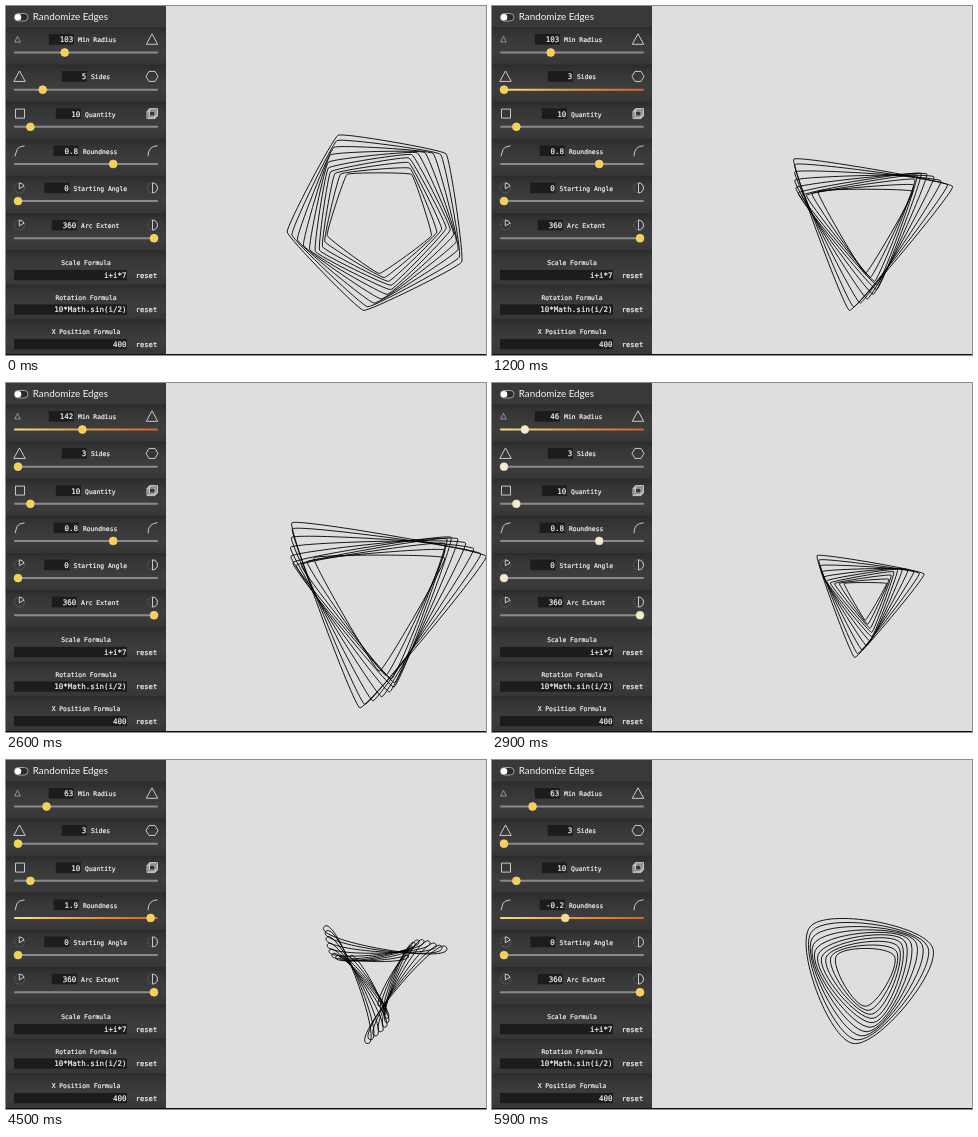
These frames come from a looping animation (480 by 349 pixels, 6000 ms). An HTML page:

```html
<!DOCTYPE html>
<html lang="en">
<head>
<meta charset="utf-8">
<title>Polygon generator</title>
<style>
  html, body { margin: 0; width: 100%; height: 100%; overflow: hidden; background: #dedede; }
  svg { display: block; }
  text { fill: #f4f4f4; stroke: #f4f4f4; stroke-width: .2; font-family: "DejaVu Sans Mono", monospace; }
  .title { font: 9.8px Lato, sans-serif; stroke: none; }
  .label { font-size: 6.35px; }
  .value { font-size: 7.5px; text-anchor: end; }
  .reset { font-size: 7.1px; }
  .mid { text-anchor: middle; }
  .icon { fill: none; stroke: #d8d8d8; stroke-width: .9; }
  .box { fill: #1c1c1c; }
  .thumb { stroke: #e9dcae; stroke-width: .7; }
  .lines { fill: none; stroke: #000; stroke-width: .9; }
</style>
</head>
<body>
<svg id="stage" width="480" height="349" viewBox="0 0 480 349">
  <defs>
    <linearGradient id="row" x2="0" y2="1">
      <stop offset="0" stop-color="#2b2b2b"/>
      <stop offset=".22" stop-color="#363636"/>
      <stop offset=".65" stop-color="#3d3d3d"/>
      <stop offset="1" stop-color="#363636"/>
    </linearGradient>
    <linearGradient id="hot">
      <stop offset="0" stop-color="#f8e07a"/>
      <stop offset=".45" stop-color="#e6a04a"/>
      <stop offset="1" stop-color="#da5f2c"/>
    </linearGradient>
  </defs>
  <rect width="160" height="349" fill="#393939"/>
  <rect x="8.5" y="7.5" width="13.5" height="7.5" rx="3.7" fill="#2a2a2a" stroke="#bbb" stroke-width=".8"/>
  <circle cx="12" cy="11.2" r="3.3" fill="#fff"/>
  <text class="title" x="26.8" y="14.3">Randomize Edges</text>
</svg>
<script>
const stage = document.getElementById('stage');

function add(tag, attrs, text) {
  const el = document.createElementNS('http://www.w3.org/2000/svg', tag);
  for (const key in attrs) el.setAttribute(key, attrs[key]);
  if (text) el.textContent = text;
  return stage.appendChild(el);
}

const icon = (d, y, extra) => add('path', { class: 'icon', d, transform: `translate(0 ${y})`, ...extra });
const dial = (x, y, d) => {
  add('circle', { class: 'icon', cx: x, cy: y, r: 5, 'stroke-dasharray': '1 1.2', opacity: .4 });
  icon(d, y);
};

// label, minimum, maximum, right edge of the value box, icons
const wedge = 'M13.3 .8V-5A5.2 5.2 0 0 1 18 -1.8Z';
const half = 'M146.5 -5A5 5 0 0 1 146.5 5Z';
const specs = [
  ['Min Radius', 0, 300, 67.3, 'M11.5 -3L14.3 2.7H8.7Z', 'M146 -5.5L151.7 5H140.3Z'],
  ['Sides', 3, 14, 80.2, 'M13.5 -5.5L19.2 5H7.8Z', 'M143 -5H149L152 0L149 5H143L140 0Z'],
  ['Quantity', 1, 100, 74.3, 'M9.5 -4.5H18.5V4.5H9.5Z', 'M141 -2.5H149V5H141ZM143.5 -5H151.5V2.5H143.5ZM142.2 -3.8H150.2V3.8H142.2Z'],
  ['Roundness', -2, 2, 72.1, 'M9 5.5L11 -1.3Q12 -4 18.5 -5', 'M142 5.5Q142 -4.5 151.5 -5'],
  ['Starting Angle', 0, 360, 62.8, wedge, half],
  ['Arc Extent', 0, 360, 70.3, wedge, half]
];

const sliders = specs.map(([label, min, max, edge, left, right], k) => {
  const y = 33.3 + 37.15 * k;
  add('rect', { x: 0, y: y - 12, width: 160, height: 37.2, fill: 'url(#row)' });
  if (k > 3) {
    dial(13.5, y, left);
    dial(146.5, y, right);
  } else {
    icon(left, y, k ? {} : { opacity: .6 });
    icon(right, y);
  }
  add('rect', { class: 'box', x: edge - 24.5, y: y - 5.3, width: 25, height: 10.6 });
  const value = add('text', { class: 'value', x: edge, y: y + 3 });
  add('text', { class: 'label', x: edge + 4.8, y: y + 2.9 }, label);
  const track = add('rect', { x: 8, y: y + 12.2, width: 144, height: 2, rx: 1 });
  const thumb = add('circle', { class: 'thumb', cy: y + 13.2, r: 3.9 });
  return { min, max, value, track, thumb };
});

[['Scale', 'i+i*7'], ['Rotation', '10*Math.sin(i/2)'], ['X Position', '400']].forEach(([name, code], k) => {
  const y = 256.7 + 34.5 * k;
  add('rect', { x: 0, y: y - 12.5, width: 160, height: 34.6, fill: 'url(#row)' });
  add('text', { class: 'label mid', x: 80, y: y + 2.3 }, name + ' Formula');
  add('rect', { class: 'box', x: 8, y: y + 7.2, width: 113, height: 10.3 });
  add('text', { class: 'value', x: 120.5, y: y + 15 }, code);
  add('text', { class: 'reset', x: 129.8, y: y + 15 }, 'reset');
});
add('rect', { x: 0, y: 348, width: 480, height: 1, fill: '#111' });
const lines = add('path', { class: 'lines' });

// Closed cardinal spline through the corners of a regular polygon.
function ring(radius, turn, sides, tension) {
  const k = (1 - tension) / 6;
  const corner = n => {
    const a = Math.PI / 2 - turn + n * 2 * Math.PI / sides;
    return [373.3 + radius * Math.cos(a), 212.7 + radius * Math.sin(a)];
  };
  const handle = (n, dir) => {
    const p = corner(n), a = corner(n - 1), b = corner(n + 1);
    return p.map((v, j) => v + dir * k * (b[j] - a[j]));
  };
  const fmt = p => p.map(v => v.toFixed(2)).join(' ');
  let d = 'M' + fmt(corner(0));
  for (let n = 0; n < sides; n++) {
    d += 'C' + [handle(n, 1), handle(n + 1, -1), corner(n + 1)].map(fmt).join(' ');
  }
  return d + 'Z';
}

// Piecewise linear value from [time, value] points.
function along(points, t) {
  const n = points.findIndex(p => p[0] > t);
  if (n === 0) return points[0][1];
  if (n < 0) return points[points.length - 1][1];
  const [t0, a] = points[n - 1], [t1, b] = points[n];
  return a + (b - a) * (t - t0) / (t1 - t0);
}

const radiusPath = [[2300, 103], [2500, 150], [2600, 142], [2800, 105], [2900, 46], [3100, 34], [3300, 52], [3500, 63]];
const roundPath = [[3800, .8], [4000, 1.2], [4200, 1.7], [4400, 1.9], [4500, 1.9], [4600, 1.5],
  [4900, -.8], [5000, -1], [5300, -1], [5600, -.6], [5900, -.2]];

function activeSlider(t) {
  if (t >= 200 && t < 1600) return 1;
  if (t >= 2200 && t < 3600) return 0;
  return t >= 3800 ? 3 : -1;
}

function draw(t) {
  const radius = Math.round(along(radiusPath, t));
  const sides = t < 600 ? 5 : t < 900 ? 4 : 3;
  const tension = Math.round(along(roundPath, t) * 10) / 10;
  const values = [radius, sides, 10, tension, 0, 360];
  const active = activeSlider(t);
  const pale = t >= 2800 && t < 3200;

  sliders.forEach((s, k) => {
    s.value.textContent = values[k];
    s.thumb.setAttribute('cx', 12 + 136 * (values[k] - s.min) / (s.max - s.min));
    s.thumb.setAttribute('fill', pale ? '#f3ecd4' : k === active && t >= 4900 ? '#f6dc90' : '#fad046');
    s.track.setAttribute('fill', k === active ? 'url(#hot)' : '#8a8a8a');
  });

  let d = '';
  for (let i = 0; i < 10; i++) {
    const turn = 10 * Math.sin(i / 2) * Math.PI / 180;
    d += ring((radius + i + i * 7) * .532, turn, sides, tension);
  }
  lines.setAttribute('d', d);
}

let last = -1;
function tick() {
  const t = Math.floor(performance.now() % 6000 / 100) * 100;
  if (t !== last) draw(last = t);
  requestAnimationFrame(tick);
}
tick();
</script>
</body>
</html>
```
